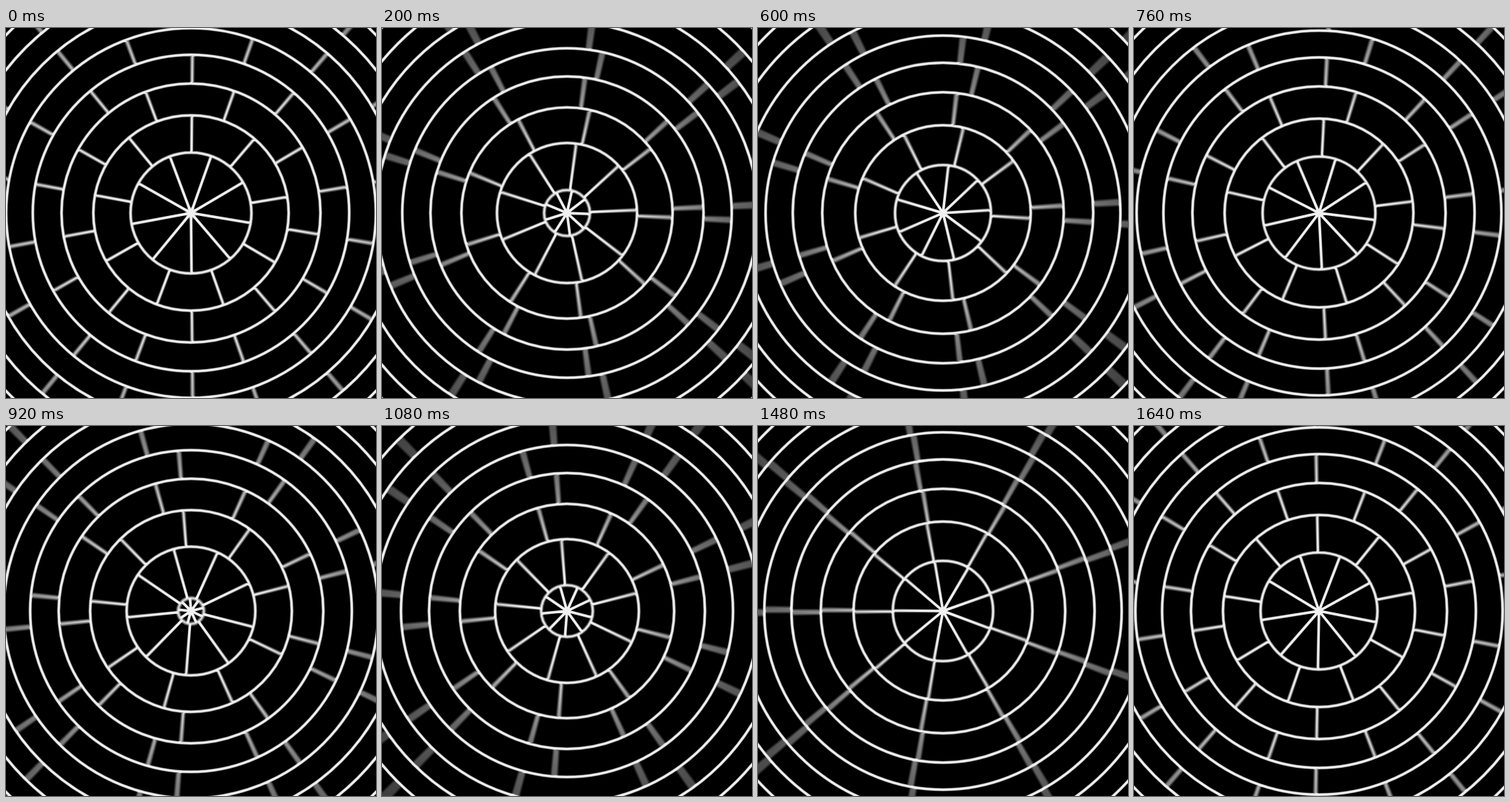
An HTML page with a canvas for the animation above (1.68 s loop, 500 by 500 pixels).

```html
<!DOCTYPE html>
<html>
<head>
<meta charset="utf-8">
<style>
  html, body { margin: 0; width: 100%; height: 100%; overflow: hidden; background: #000; }
  canvas { display: block; }
</style>
</head>
<body>
<canvas id="stage" width="500" height="500"></canvas>
<script>
const ctx = document.getElementById('stage').getContext('2d');
const LOOP = 1680, STEP = 40, STEPS_PER_RING = 21;
const SAMPLES = 16, SHUTTER = 0.7, SPOKES = 9, BANDS = 10;
const rad = deg => deg * Math.PI / 180;
const radius = n => 80.8 * Math.pow(n, 0.7);
const ease = u => (u + u * u * (3 - 2 * u)) / 2;

// Rings grow outwards while neighbouring bands turn in opposite directions.
function tracePath(phase) {
  const cycle = Math.floor(phase), u = phase - cycle;
  const turn = rad(10 - 60 * (cycle + ease(u)));
  ctx.beginPath();
  for (let k = 0; k < BANDS; k++) {
    const inner = k ? radius(u + k - 1) : 0, outer = radius(u + k);
    const angle = (k + cycle) % 2 ? turn : -turn;
    ctx.moveTo(outer, 0);
    ctx.arc(0, 0, outer, 0, 2 * Math.PI);
    for (let i = 0; i < SPOKES; i++) {
      const a = angle + i * 2 * Math.PI / SPOKES;
      const x = Math.cos(a), y = Math.sin(a);
      ctx.moveTo(inner * x, inner * y);
      ctx.lineTo(outer * x, outer * y);
    }
  }
}

// Motion blur: average several moments while the shutter is open.
function draw(step) {
  ctx.setTransform(1, 0, 0, 1, 0, 0);
  ctx.globalCompositeOperation = 'source-over';
  ctx.globalAlpha = 1;
  ctx.fillStyle = '#000';
  ctx.fillRect(0, 0, 500, 500);
  ctx.translate(250, 250);
  ctx.globalCompositeOperation = 'lighter';
  ctx.globalAlpha = 1 / SAMPLES;
  ctx.strokeStyle = 'rgb(236, 236, 236)';
  ctx.lineWidth = 3.5;
  for (let i = 0; i < SAMPLES; i++) {
    tracePath((step + SHUTTER * i / SAMPLES) / STEPS_PER_RING);
    ctx.stroke();
  }
}

const start = performance.now();
let shown = -1;
function tick() {
  const step = Math.floor((performance.now() - start) % LOOP / STEP);
  if (step !== shown) draw(shown = step);
  requestAnimationFrame(tick);
}
tick();
</script>
</body>
</html>
```
